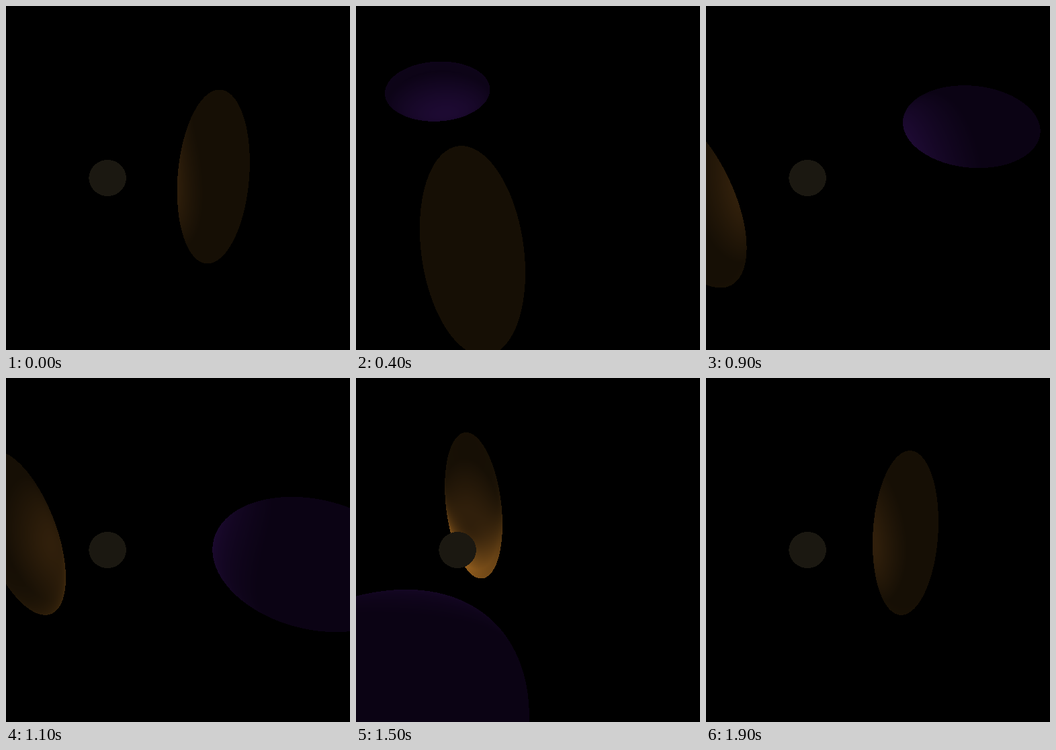
Write an HTML page with a canvas that moves like this. It is 512 by 512 pixels and loops after 2 s.

```html
<!DOCTYPE html>
<html lang="en">
<head>
<meta charset="utf-8">
<title>Orbiting ellipsoids</title>
<style>
  html, body { margin: 0; width: 100%; height: 100%; overflow: hidden; background: #000; }
  canvas { display: block; width: 100vmin; height: 100vmin; }
</style>
</head>
<body>
<canvas id="stage" width="512" height="512"></canvas>
<script>
const SIZE = 512, FOCAL = 433, STEP = 100, STEPS = 20;
const CAMERA = [1.985, 4.66, 6.78];
const PITCH = Math.atan2(CAMERA[1], CAMERA[2]);
const SIN = Math.sin(PITCH), COS = Math.cos(PITCH);

// The lamp sits at the world origin; the other bodies circle around it.
const bodies = [
  { scale: [.51, .51, .51], orbit: 0, height: 0, phase: 0,
    base: [27, 24, 17], diffuse: [0, 0, 0], gloss: [0, 0, 0] },
  { scale: [1.01, 2.96, 1.01], orbit: 2.97, height: -.47, phase: 0,
    base: [22, 15, 5], diffuse: [26, 16, 6], gloss: [140, 88, 28] },
  { scale: [2, 1, 2], orbit: 5, height: .97, phase: Math.PI,
    base: [11, 3, 20], diffuse: [18, 7, 30], gloss: [15, 5, 26] }
];

const ctx = document.getElementById('stage').getContext('2d');
const image = ctx.createImageData(SIZE, SIZE);

const dot = (a, b) => a[0] * b[0] + a[1] * b[1] + a[2] * b[2];
const unit = v => {
  const length = Math.hypot(v[0], v[1], v[2]);
  return [v[0] / length, v[1] / length, v[2] / length];
};

function place(body, turn) {
  const angle = turn + body.phase;
  body.center = [body.orbit * Math.cos(angle), body.height, body.orbit * Math.sin(angle)];
  body.eye = body.center.map((c, i) => (CAMERA[i] - c) / body.scale[i]);
  body.eyeTerm = dot(body.eye, body.eye) - 1;
}

// Distance along the ray to the near side of the ellipsoid.
function hit({ eye, eyeTerm, scale }, x, y, z) {
  x /= scale[0]; y /= scale[1]; z /= scale[2];
  const a = x * x + y * y + z * z;
  const b = eye[0] * x + eye[1] * y + eye[2] * z;
  const root = b * b - a * eyeTerm;
  return root < 0 ? Infinity : (-b - Math.sqrt(root)) / a;
}

// Normals stay those of the unscaled sphere; the glint grows where the lamp
// lies along the line of sight and the surface turns away from it.
function shade(body, ray, distance) {
  if (!body.orbit) return body.base;
  const point = CAMERA.map((c, i) => c + ray[i] * distance);
  const normal = point.map((p, i) => (p - body.center[i]) / body.scale[i]);
  const light = unit(point.map(p => -p));
  const facing = Math.max(0, dot(normal, light));
  const glint = Math.max(0, -dot(light, unit(ray))) ** 10 * (1 - facing);
  return body.base.map((c, i) => c + body.diffuse[i] * facing + body.gloss[i] * glint);
}

function draw(turn) {
  bodies.forEach(body => place(body, turn));
  const data = image.data;
  for (let row = 0, at = 0; row < SIZE; row++) {
    const up = SIZE / 2 - row - .5;
    const y = up * COS - FOCAL * SIN, z = -up * SIN - FOCAL * COS;
    for (let col = 0; col < SIZE; col++, at += 4) {
      const x = col + .5 - SIZE / 2;
      let near = Infinity, front = null;
      for (const body of bodies) {
        const distance = hit(body, x, y, z);
        if (distance < near) { near = distance; front = body; }
      }
      const color = front ? shade(front, [x, y, z], near) : [0, 0, 0];
      data[at] = color[0];
      data[at + 1] = color[1];
      data[at + 2] = color[2];
      data[at + 3] = 255;
    }
  }
  ctx.putImageData(image, 0, 0);
}

let shown = -1;
function tick() {
  const step = Math.floor(performance.now() / STEP) % STEPS;
  if (step !== shown) draw(2 * Math.PI * step / STEPS);
  shown = step;
  requestAnimationFrame(tick);
}
tick();
</script>
</body>
</html>
```
